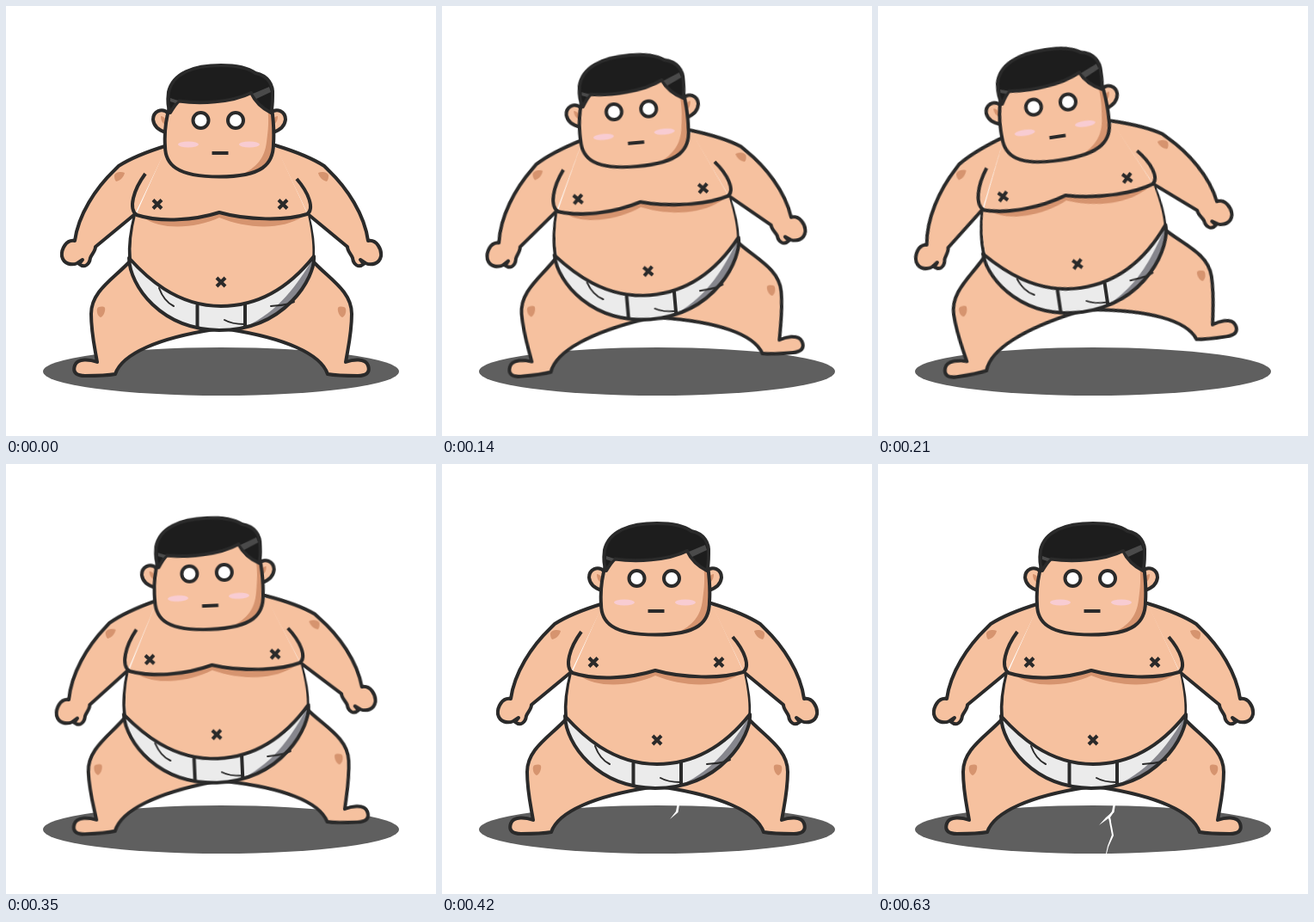
Recreate the animation shown at these times as an HTML page. Size 500 px wide and 500 px high, loop 0.83 s.

```html
<!DOCTYPE html>
<html lang="en">
<head>
<meta charset="utf-8">
<title>Sumo stomp</title>
<style>
  html, body { margin: 0; width: 100%; height: 100%; overflow: hidden; background: #fff; }
  svg { display: block; width: 100%; height: 100%; }

  .line { stroke: #2a2a2a; stroke-width: 4; stroke-linecap: round; stroke-linejoin: round; }
  .thin { stroke-width: 2; }
  .butt { stroke-linecap: butt; }
  .open { fill: none; }
  .skin { fill: #f6c19f; }
  .shade { fill: #d6946f; }
  .cloth { fill: #ebebeb; }
  .blush { fill: #f8ccd2; }
  .gleam { fill: #4a4a4a; }

  /* The whole figure tips over the planted foot, in held steps. */
  .figure { transform-origin: 100px 432px; animation: stomp 830ms step-end infinite; }
  @keyframes stomp {
    0%, 50.59% { transform: rotate(0deg); }
    8.43%, 42.16% { transform: rotate(-2.5deg); }
    16.86%, 33.73% { transform: rotate(-5deg); }
    25.29% { transform: rotate(-8.5deg); }
  }

  /* The ground splits piece by piece after the landing. */
  .crack path { fill: #fff; opacity: 0; animation: 830ms step-end infinite; }
  .crack path:nth-child(1) { animation-name: split1; }
  .crack path:nth-child(2) { animation-name: split2; }
  .crack path:nth-child(3) { animation-name: split3; }
  .crack path:nth-child(4) { animation-name: split4; }
  @keyframes split1 { 0% { opacity: 0; } 50.59% { opacity: 1; } }
  @keyframes split2 { 0% { opacity: 0; } 59.02% { opacity: 1; } }
  @keyframes split3 { 0% { opacity: 0; } 67.46% { opacity: 1; } }
  @keyframes split4 { 0% { opacity: 0; } 75.89% { opacity: 1; } }
</style>
</head>
<body>
<svg viewBox="0 0 500 500">
  <defs>
    <g id="leg">
      <path class="line skin" d="M143 298C124 318 99 332 99 358C99 380 103 396 106 414C98 411 83 409 80 418C77 427 83 430 92 430C105 430 116 430 127 428C135 404 178 386 242 376"/>
      <path class="shade" d="M106 352C107 349 114 349 115 351C116 355 113 361 110 362C107 361 105 356 106 352Z"/>
    </g>
    <g id="arm">
      <path class="line skin" d="M188 162C165 169 145 177 131 186L126 191C104 212 84 243 80 273C70 271 64 283 65 291C67 300 76 302 83 299L89 295L85 300C91 305 97 301 98 293C100 288 104 285 104 280L150 242"/>
      <path class="shade" d="M126 197C127 193 134 192 138 194C137 199 133 203 128 204C126 202 126 199 126 197Z"/>
      <path class="line open" d="M150 243C145 262 143 278 144 294"/>
    </g>
    <g id="ear">
      <path class="line skin" d="M189 125C181 117 171 123 171 132C172 141 179 145 186 147"/>
      <path class="shade" d="M180 128C184 128 188 133 187 139C182 137 180 133 180 128Z"/>
    </g>
    <path id="cross" class="line butt" d="M-5-5L5 5M5-5L-5 5"/>
    <circle id="eye" class="line" r="9" fill="#fff"/>
    <path id="face" d="M190 118C185 135 184 148 185 163C185 184 198 198.500 248 198.500C298 198.500 311 184 311 160C312 146 311 133 309 118"/>
    <path id="briefs" d="M143 293C162 314 197 349 250 349C304 349 339 315 358 291C360 315 325 377 248 377C180 376 144 326 143 293Z"/>
  </defs>

  <ellipse cx="250" cy="425" rx="207" ry="28" fill="#5f5f5f"/>
  <g class="crack">
    <path d="M273.500 396H276L274.500 405L265 413L272 404Z"/>
    <path d="M272 405L274 405L270 411L271 417L268 412L257 420L265 411Z"/>
    <path d="M268 411L270 411L274 432L272 432Z"/>
    <path d="M272 431L274 432L268 445L266 453H265L267 444Z"/>
  </g>

  <g class="figure">
    <use href="#leg"/>
    <use href="#leg" transform="matrix(-1 0 0 1 501 0)"/>

    <use href="#arm"/>
    <use href="#arm" transform="matrix(-1 0 0 1 501 0)"/>
    <path class="skin" d="M186 165H315L351 243Q358 275 356 294C335 350 290 352 250 354C200 352 160 340 146 294Q144 270 151 243Z"/>

    <use href="#briefs" class="cloth"/>
    <path fill="#86868d" d="M359 294C357 325 325 365 278 373C318 355 338 324 357 294Z"/>
    <use href="#briefs" class="line open"/>
    <path class="line open" d="M222.500 348V373M278 346V373"/>
    <path class="line thin open" d="M178 328C182 339 187 345 195 349M254 365C261 369 269 370 277 370M308 349C319 348 327 348 335 344"/>

    <path class="shade" d="M160 246C195 252 224 247 248 240C278 248 310 250 345 245C320 261 280 259 248 246C220 259 180 261 160 246Z"/>
    <path class="line butt open" d="M162 195C148 214 142 236 152 243C180 252 220 249 248 240C280 249 325 250 350 242C359 236 352 217 338 201"/>
    <use href="#cross" x="176" y="230.500"/>
    <use href="#cross" x="322" y="230.500"/>
    <use href="#cross" x="250" y="321"/>

    <use href="#ear"/>
    <use href="#ear" transform="matrix(-1 0 0 1 496 0)"/>
    <path class="skin" d="M190 100H308V120H190Z"/>
    <use href="#face" class="skin"/>
    <path class="shade" d="M308 118C312 150 313 166 308 178C302 192 290 196 272 197C292 188 301 176 303 158C305 144 306 132 304 118Z"/>
    <use href="#face" class="line open"/>
    <ellipse class="blush" cx="212" cy="161" rx="12" ry="3.500"/>
    <ellipse class="blush" cx="283" cy="161" rx="12" ry="3.500"/>
    <use href="#eye" x="226.500" y="133"/>
    <use href="#eye" x="267" y="133"/>
    <path class="line butt" d="M239.500 171H258.500"/>

    <path class="line" fill="#1d1d1d" d="M191 124C188 118 188 108 189 100C194 78 218 69 250 69C270 69 283 73 290 78C305 81 311 92 310 104C310 112 310 118 308 124C298 119 290 112 285 101C262 112.500 225 114 201 110.500C197 114 194 119 191 124Z"/>
    <path class="gleam" d="M287 102L306 94L308 100L291 108Z"/>
    <path class="gleam" d="M191 107L200 110L197 113L191 111Z"/>
  </g>
</svg>
</body>
</html>
```
